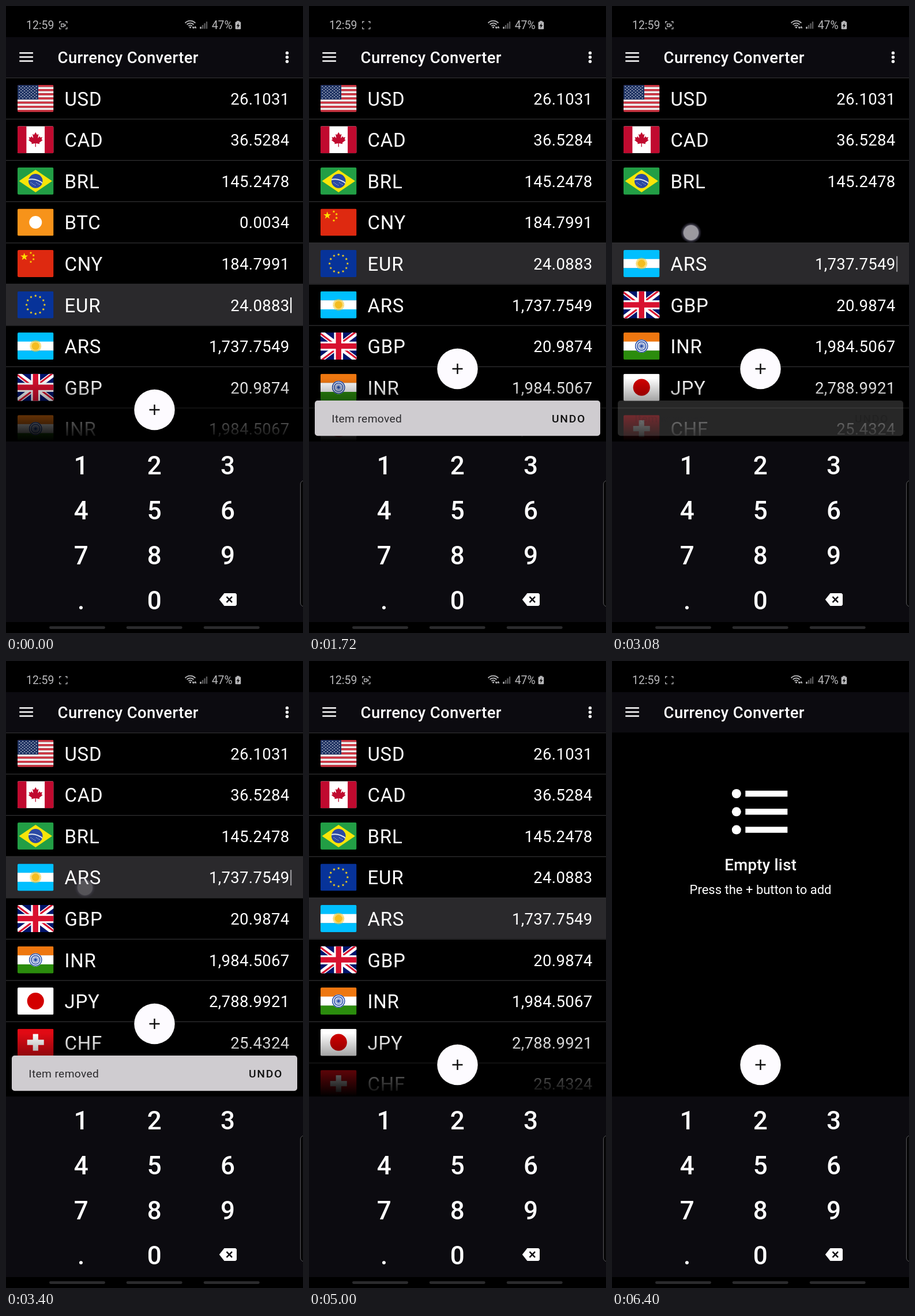
Animation of 515 by 1087 pixels, one loop 6880 ms. Source, as an HTML page with a canvas:

```html
<!DOCTYPE html>
<html lang="en">
<head>
<meta charset="utf-8">
<title>Currency Converter</title>
<style>
html, body { margin: 0; width: 100%; height: 100%; overflow: hidden; background: #000; }
canvas { display: block; width: 515px; height: 1087px; }
</style>
</head>
<body>
<canvas id="stage" width="515" height="1087"></canvas>
<script>
const ctx = document.getElementById("stage").getContext("2d");
const LOOP = 6880, TAU = Math.PI * 2;
const TOP = 124, PITCH = 71.55, LIST_END = 755, FLAG_W = 62.5, FLAG_H = 47;
const UNDO = 3780, CLEAR = 5880, BLINK = 1020;
const PANEL = "#0c0b10", RAISED = "#2a292c";

const clamp = v => Math.max(0, Math.min(1, v));
const ramp = (t, start, dur) => clamp((t - start) / dur);
const smooth = p => (1 - Math.cos(Math.PI * p)) / 2;
const mix = (a, b, p) => a + (b - a) * p;

function rect(x, y, w, h, color) {
  ctx.fillStyle = color;
  ctx.fillRect(x, y, w, h);
}
function roundRect(x, y, w, h, r, color) {
  ctx.fillStyle = color;
  ctx.beginPath();
  ctx.roundRect(x, y, w, h, r);
  ctx.fill();
}
function disc(x, y, r, color) {
  ctx.fillStyle = color;
  ctx.beginPath();
  ctx.arc(x, y, r, 0, TAU);
  ctx.fill();
}
function poly(points, color) {
  ctx.fillStyle = color;
  ctx.beginPath();
  points.forEach(([x, y]) => ctx.lineTo(x, y));
  ctx.closePath();
  ctx.fill();
}
function line(x1, y1, x2, y2, width, color) {
  ctx.strokeStyle = color;
  ctx.lineWidth = width;
  ctx.beginPath();
  ctx.moveTo(x1, y1);
  ctx.lineTo(x2, y2);
  ctx.stroke();
}
function star(x, y, r, color) {
  const pts = [];
  for (let i = 0; i < 10; i++) {
    const a = i * TAU / 10 - Math.PI / 2, d = i % 2 ? r * 0.4 : r;
    pts.push([x + d * Math.cos(a), y + d * Math.sin(a)]);
  }
  poly(pts, color);
}
function text(str, x, y, size, { weight = 400, color = "#fff", align = "left", gap = 0 } = {}) {
  ctx.font = `${weight} ${size}px Roboto, sans-serif`;
  ctx.letterSpacing = gap + "px";
  ctx.textAlign = align;
  ctx.fillStyle = color;
  ctx.fillText(str, x, y);
}
function faded(alpha, draw) {
  if (alpha <= 0) return;
  ctx.save();
  ctx.globalAlpha *= alpha;
  draw();
  ctx.restore();
}
function bands(colors) {
  const h = FLAG_H / colors.length;
  colors.forEach((c, i) => rect(0, i * h, FLAG_W, h + 0.3, c));
}

const CX = FLAG_W / 2, CY = FLAG_H / 2;
const HALF_LEAF = [[0, -1], [.2, -.66], [.4, -.76], [.3, -.2], [.56, -.46], [.63, -.3], [.9, -.36],
  [.8, -.05], [.95, .05], [.5, .4], [.54, .56], [.05, .48], [.05, .95]];

const flags = {
  USD() {
    for (let i = 0; i < 13; i++) rect(0, i * FLAG_H / 13, FLAG_W, 3.7, i % 2 ? "#f4f0f0" : "#cf3543");
    rect(0, 0, 36, FLAG_H * 7 / 13, "#1f3363");
    for (let r = 0; r < 9; r++)
      for (let c = 0; c < (r % 2 ? 5 : 6); c++)
        disc(3.2 + c * 5.9 + (r % 2) * 2.95, 2.8 + r * 2.5, 0.85, "#e4e6ee");
  },
  CAD() {
    rect(0, 0, FLAG_W, FLAG_H, "#fff");
    rect(0, 0, 15.4, FLAG_H, "#c00a2f");
    rect(47.1, 0, 15.4, FLAG_H, "#c00a2f");
    const mirror = HALF_LEAF.slice().reverse().map(([x, y]) => [-x, y]);
    poly(HALF_LEAF.concat(mirror).map(([x, y]) => [CX + x * 13, CY + y * 13]), "#c00a2f");
  },
  BRL() {
    rect(0, 0, FLAG_W, FLAG_H, "#229e45");
    poly([[2.5, CY], [CX, 4], [60, CY], [CX, 43]], "#f8e509");
    disc(CX, CY, 12.3, "#2b49a3");
    ctx.save();
    ctx.beginPath();
    ctx.arc(CX, CY, 12.3, 0, TAU);
    ctx.clip();
    ctx.strokeStyle = "#dfe6f0";
    ctx.lineWidth = 2;
    ctx.beginPath();
    ctx.arc(CX - 6, CY + 24, 27, -2, -0.4);
    ctx.stroke();
    ctx.restore();
    for (let i = 0; i < 7; i++) disc(CX - 8 + i * 2.4, CY + 3 + (i * 5 % 4) * 1.5, 0.6, "#cdd6ec");
  },
  BTC() {
    rect(0, 0, FLAG_W, FLAG_H, "#f7931a");
    disc(CX, CY, 11, "#fff");
  },
  CNY() {
    rect(0, 0, FLAG_W, FLAG_H, "#de2910");
    star(11.7, 11.7, 6.8, "#ffde00");
    [[23, 5], [27.7, 9.4], [27.7, 16], [23, 20.5]].forEach(([x, y]) => star(x, y, 2.6, "#ffde00"));
  },
  EUR() {
    rect(0, 0, FLAG_W, FLAG_H, "#073399");
    for (let i = 0; i < 12; i++)
      star(CX + 15.6 * Math.sin(i * TAU / 12), CY - 15.6 * Math.cos(i * TAU / 12), 2.6, "#ffd617");
  },
  ARS() {
    bands(["#00bfff", "#fff", "#00bfff"]);
    for (let i = 0; i < 24; i++) {
      const a = i * TAU / 24;
      line(CX, CY, CX + 10 * Math.cos(a), CY + 10 * Math.sin(a), 1.3, "#f6c62c");
    }
    disc(CX, CY, 6.4, "#f4bd20");
  },
  GBP() {
    rect(0, 0, FLAG_W, FLAG_H, "#00146b");
    line(0, 0, FLAG_W, FLAG_H, 9.4, "#fff");
    line(0, FLAG_H, FLAG_W, 0, 9.4, "#fff");
    [[0, 0], [FLAG_W, 0], [FLAG_W, FLAG_H], [0, FLAG_H]].forEach(([x, y]) => {
      const d = Math.hypot(x - CX, y - CY);
      const ox = (y - CY) / d * 1.6, oy = -(x - CX) / d * 1.6;
      line(CX + ox, CY + oy, x + ox, y + oy, 3.1, "#d8102f");
    });
    [["#fff", 15.6], ["#d8102f", 9.4]].forEach(([c, w]) => {
      rect(CX - w / 2, 0, w, FLAG_H, c);
      rect(0, CY - w / 2, FLAG_W, w, c);
    });
  },
  INR() {
    bands(["#ee7710", "#fff", "#2b8c0d"]);
    disc(CX, CY, 11.5, "#fff");
    for (let i = 0; i < 24; i++) {
      const a = i * TAU / 24;
      line(CX, CY, CX + 8 * Math.cos(a), CY + 8 * Math.sin(a), 0.6, "#3d5fae");
    }
    ctx.strokeStyle = "#2a4fa8";
    ctx.lineWidth = 1.5;
    ctx.beginPath();
    ctx.arc(CX, CY, 10.6, 0, TAU);
    ctx.moveTo(CX + 7.6, CY);
    ctx.arc(CX, CY, 7.6, 0, TAU);
    ctx.stroke();
    disc(CX, CY, 2.2, "#2a4fa8");
  },
  JPY() {
    rect(0, 0, FLAG_W, FLAG_H, "#fff");
    disc(CX, CY, 14.6, "#d30000");
  },
  CHF() {
    rect(0, 0, FLAG_W, FLAG_H, "#e10a14");
    rect(CX - 14.5, CY - 4.6, 29, 9.2, "#fff");
    rect(CX - 4.6, CY - 14.5, 9.2, 29, "#fff");
  }
};

const rows = [["USD", "26.1031"], ["CAD", "36.5284"], ["BRL", "145.2478"], ["BTC", "0.0034"],
  ["CNY", "184.7991"], ["EUR", "24.0883"], ["ARS", "1,737.7549"], ["GBP", "20.9874"],
  ["INR", "1,984.5067"], ["JPY", "2,788.9921"], ["CHF", "25.4324"]];

// at: moment the row is gone; x, y: where the finger stops
const swipes = [
  { row: 3, at: 1260, x: 139, y: 382 },
  { row: 4, at: 2084, x: 144, y: 381 },
  { row: 5, at: 3020, x: 137, y: 393 }
];
const SWIPE = 100;
const taps = [[450, 716, 3640], [487, 90, 4560], [407, 588, 5740]];
const snacks = [[1300, 150, 2084], [2380, 100, 3020], [3280, 100, UNDO]];

function slotOf(i, t) {
  let slot = i;
  for (const s of swipes) if (i > s.row) slot -= smooth(ramp(t, s.at + 120, 250));
  if (i > 5) slot += smooth(ramp(t, UNDO, 250));
  return slot;
}

function cursorOn(t) {
  if (t < 3020) return t % BLINK < BLINK / 2;
  return t > 5040 || (t - 3020) % BLINK < BLINK / 2;
}

function drawRow(i, t) {
  const [code, value] = rows[i];
  const swipe = swipes.find(s => s.row === i);
  let x = 0, alpha = 1;
  if (swipe) {
    x = -515 * ramp(t, swipe.at - SWIPE, SWIPE);
    if (t >= swipe.at) {
      if (i !== 5 || t < UNDO) return;
      x = 0;
      alpha = ramp(t, UNDO + 200, 120);
    }
  }
  const active = i === (t < 3020 ? 5 : 6);
  faded(alpha, () => {
    ctx.translate(x, TOP + slotOf(i, t) * PITCH);
    rect(0, 0, 515, PITCH, active ? RAISED : "#000");
    rect(0, -0.1, 515, 1.3, "#2f2f31");
    ctx.save();
    ctx.translate(20, 12.8);
    ctx.beginPath();
    ctx.roundRect(0, 0, FLAG_W, FLAG_H, 2.2);
    ctx.clip();
    flags[code]();
    ctx.restore();
    text(code, 101.4, 48.8, 33, { gap: 0.8 });
    text(value, 491.6, 46.8, 27.5, { align: "right", gap: 0.34 });
    if (active && cursorOn(t)) rect(493, 23.5, 2.2, 27, t < 3020 ? "#fff" : "#98979a");
  });
}

function drawEmpty() {
  for (let i = 0; i < 3; i++) {
    const y = 230 + i * 31.3;
    disc(215.8, y, 8, "#fff");
    rect(231.3, y - 5.2, 73, 10.4, "#fff");
  }
  text("Empty list", 257.7, 363, 27.5, { weight: 500, align: "center", gap: 0.3 });
  text("Press the + button to add", 257.5, 404.3, 22, { align: "center" });
}

function drawList(t) {
  ctx.save();
  ctx.beginPath();
  ctx.rect(0, TOP - 0.5, 515, LIST_END - TOP + 0.5);
  ctx.clip();
  faded(1 - ramp(t, CLEAR, 120), () => rows.forEach((_, i) => drawRow(i, t)));
  const shade = ctx.createLinearGradient(0, 645, 0, LIST_END);
  shade.addColorStop(0, "rgba(0,0,0,0)");
  shade.addColorStop(1, "#000");
  rect(0, 645, 515, 110, shade);
  faded(ramp(t, CLEAR + 100, 80), drawEmpty);
  ctx.restore();
}

function drawStatus(t) {
  const gray = "#b9b9bb";
  text("12:59", 35, 40.3, 19.4, { color: gray });
  text("47%", 356.7, 40.3, 19.4, { color: gray });
  ctx.strokeStyle = gray;
  ctx.lineWidth = 1.4;
  for (const sx of [-1, 1])
    for (const sy of [-1, 1]) {
      ctx.beginPath();
      ctx.moveTo(99.3 + sx * 3.5, 33.3 + sy * 6.3);
      ctx.lineTo(99.3 + sx * 6.5, 33.3 + sy * 6.3);
      ctx.lineTo(99.3 + sx * 6.5, 33.3 + sy * 3.3);
      ctx.stroke();
    }
  if ((t - 280 + BLINK) % BLINK >= BLINK / 2) {
    ctx.strokeRect(95.8, 31, 4.8, 4.8);
    poly([[101, 33.4], [103.6, 31], [103.6, 35.8]], gray);
  }
  ctx.lineWidth = 1.9;
  [4.2, 8, 12].forEach(r => {
    ctx.beginPath();
    ctx.arc(319.5, 37.6, r, -2.4, -0.74);
    ctx.stroke();
  });
  disc(319.5, 37, 1.6, gray);
  poly([[322.5, 36], [327, 36], [324.7, 40]], gray);
  poly([[326.2, 38.5], [330.6, 38.5], [328.4, 34.5]], gray);
  for (let i = 0; i < 4; i++) {
    const h = 3.5 + i * 3;
    rect(336.3 + i * 3.5, 39.5 - h, 2.4, h, i < 1 ? gray : "#59595b");
  }
  roundRect(397.6, 27.5, 9.6, 12.7, 1.2, gray);
  rect(400, 25.8, 4.8, 2, gray);
  poly([[403.6, 29.2], [399.6, 34.8], [402, 34.8], [401.2, 38.8], [405.3, 33], [402.8, 33]], "#111");
}

function drawBar(t) {
  rect(0, 54, 515, 70, PANEL);
  for (let i = -1; i <= 1; i++) rect(23.3, 87.2 + i * 7, 23.6, 2.5, "#fff");
  text("Currency Converter", 89.6, 99, 27.5, { weight: 500, gap: 0.34 });
  if (t < CLEAR + 60) for (let i = -1; i <= 1; i++) disc(487.4, 88.8 + i * 7.4, 2.7, "#fff");
}

function drawKeys() {
  rect(0, LIST_END, 515, 313, PANEL);
  [..."123456789.0"].forEach((key, i) => {
    text(key, 130.2 + (i % 3) * 127.1, 811.8 + Math.floor(i / 3) * 78.1, 44, { weight: 500, align: "center" });
  });
  poly([[378.5, 1018], [398, 1018], [400, 1020], [400, 1038], [398, 1040], [378.5, 1040], [369.8, 1029]], "#fff");
  line(382.5, 1024.2, 392, 1033.8, 2.5, PANEL);
  line(392, 1024.2, 382.5, 1033.8, 2.5, PANEL);
}

function drawFab(t) {
  const y = t >= 1260 && t < UNDO ? 629 : mix(629, 700, t < 1260 ? 1 : smooth(ramp(t, UNDO, 150)));
  disc(257.5, y, 35.2, "#fdfbff");
  line(248.5, y, 266.5, y, 2.5, "#111");
  line(257.5, y - 9, 257.5, y + 9, 2.5, "#111");
}

function drawSnack(t) {
  for (const [start, dur, end] of snacks) {
    const show = ramp(t, start, dur);
    faded(show * (1 - ramp(t, end, 75)), () => {
      const k = mix(0.8, 1, 1 - (1 - show) ** 2);
      ctx.translate(257.5, 714.5);
      ctx.scale(k, k);
      ctx.translate(-257.5, -714.5);
      roundRect(10, 684, 495, 61.3, 5, "#cfccd0");
      text("Item removed", 39.3, 722.3, 19.25, { color: "#2c2b2e", gap: 0.34 });
      text("UNDO", 421, 722.3, 19.25, { weight: 500, color: "#111", gap: 1.72 });
    });
  }
}

function drawDialog(t) {
  const alpha = ramp(t, 5180, 150) * (1 - ramp(t, 5850, 120));
  faded(alpha, () => {
    rect(0, 54, 515, 1033, "rgba(0,0,0,0.32)");
    roundRect(43.7, 502, 428, 117, 8, RAISED);
    text("Remove all currencies?", 72.7, 548, 22, { gap: 0.35 });
    text("CANCEL", 254.8, 594.4, 19.25, { weight: 500, gap: 1.72 });
    text("OK", 392.2, 594.4, 19.25, { weight: 500, gap: 1.72 });
  });
}

function drawEdges() {
  [75, 208.7, 342.7].forEach(x => roundRect(x, 1075.3, 97, 4.6, 2.3, "#2b2b2d"));
  ctx.strokeStyle = "#58585a";
  ctx.lineWidth = 1;
  ctx.beginPath();
  ctx.roundRect(510.5, 823, 20, 218, 6);
  ctx.fillStyle = "#060607";
  ctx.fill();
  ctx.stroke();
}

function drawDot(x, y, alpha) {
  faded(alpha, () => {
    const g = ctx.createRadialGradient(x, y, 0, x, y, 18.5);
    g.addColorStop(0, "rgba(178,175,180,0.88)");
    g.addColorStop(0.68, "rgba(176,174,182,0.88)");
    g.addColorStop(0.76, "rgba(120,116,140,0.5)");
    g.addColorStop(1, "rgba(70,66,100,0)");
    disc(x, y, 18.5, g);
  });
}

function drawTouches(t) {
  for (const s of swipes) {
    const p = ramp(t, s.at - SWIPE, SWIPE);
    if (p > 0) drawDot(mix(400, s.x, p), s.y, 1 - ramp(t, s.at + 280, 160));
  }
  for (const [x, y, at] of taps) drawDot(x, y, ramp(t, at, 40) * (1 - ramp(t, at + 120, 160)));
}

function draw(t) {
  rect(0, 0, 515, 1087, "#000");
  drawStatus(t);
  drawBar(t);
  drawList(t);
  drawKeys();
  drawFab(t);
  drawSnack(t);
  drawDialog(t);
  drawEdges();
  drawTouches(t);
}

const begin = performance.now();
function tick() {
  draw((performance.now() - begin) % LOOP);
  requestAnimationFrame(tick);
}
tick();
</script>
</body>
</html>
```
